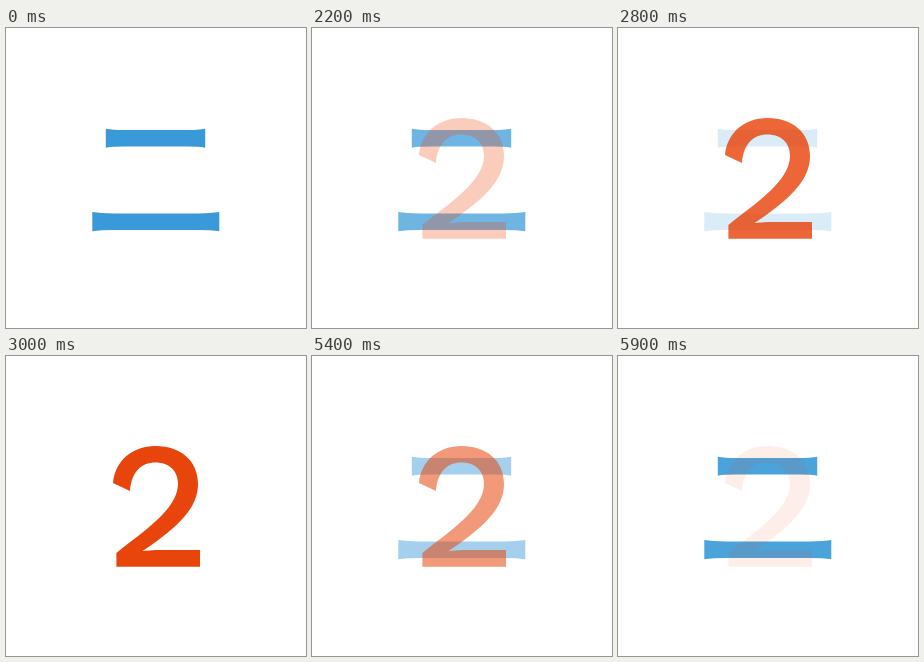
Animation of 300x300 px, one loop 6 s. Source, as an HTML page:

```html
<!DOCTYPE html>
<html lang="en">
<head>
<meta charset="utf-8">
<title>Two</title>
<style>
  html, body { margin: 0; width: 100%; height: 100%; overflow: hidden; background: #fff; }
  svg { display: block; width: 100%; height: 100%; }
</style>
</head>
<body>
<svg viewBox="0 0 300 300">
  <g id="bars" fill="#3a9ad9">
    <path d="M99.8 100.8Q107 102 118 102H181Q192 102 199.2 100.8V119.7Q192 118.6 181 118.6H118Q107 118.6 99.8 119.7Z"/>
    <path d="M86.3 184Q95 185.4 108 185.4H192Q205 185.4 213.3 184V203.2Q205 201.9 192 201.9H108Q95 201.9 86.3 203.2Z"/>
  </g>
  <path id="digit" fill="#e8450c" d="M110.4 210.8V197C136 176 172 154 172 127.500C172 115 163 106.500 149.500 106.500C135 106.500 125.500 116 124 135L107 127C109 105 126 90 149.500 90C175 90 192 105 192 128C192 151 174 170 136.500 195L150 194H194V210.800Z"/>
</svg>
<script>
  const LOOP = 6000, HOLD = 2000, STEP = 100, STEPS = 11;
  const bars = document.getElementById('bars');
  const digit = document.getElementById('digit');

  // Stepped crossfade: hold, then fade in ten hard steps to the other sign.
  function draw(ms) {
    const t = ms % LOOP, half = LOOP / 2, local = t % half;
    const k = local < HOLD ? 0 : Math.floor((local - HOLD) / STEP) + 1;
    const fade = k / STEPS;
    const shown = t < half ? fade : 1 - fade;
    digit.setAttribute('opacity', shown);
    bars.setAttribute('opacity', 1 - shown);
  }

  const start = performance.now();
  function tick() {
    draw(performance.now() - start);
    requestAnimationFrame(tick);
  }
  tick();
</script>
</body>
</html>
```
